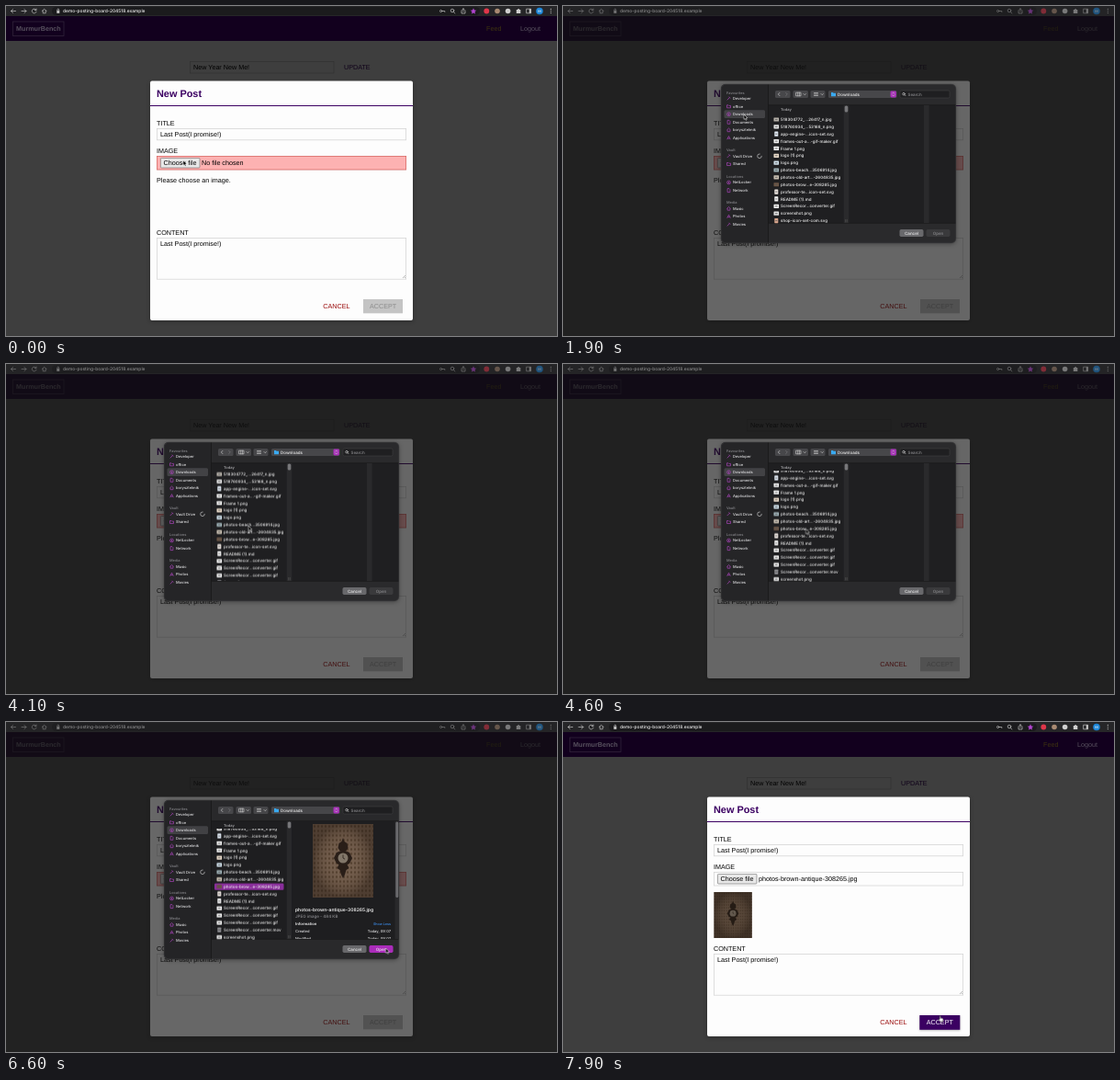
An HTML page for the animation above (8 s loop, 600x359 px).

```html
<!DOCTYPE html>
<html lang="en">
<head>
<meta charset="utf-8">
<title>New post</title>
<style>
html, body { margin: 0; width: 100%; height: 100%; overflow: hidden; background: #3e3e3e; }
svg { display: block; }
text { font: 7.2px "Liberation Sans", Arial, sans-serif; white-space: pre; text-rendering: geometricPrecision; }
.ui text { font-family: Inter, sans-serif; font-size: 4.5px; font-weight: 500; fill: #f2f2f2; }
.ui .b { font-weight: 600; }
.ui .dim { fill: #8d8d90; }
.ui .side { font-size: 4.05px; fill: #e2e2e4; }
.ui .head { font-size: 3.9px; font-weight: 600; fill: #7b7b7f; }
.line { fill: none; stroke: #c4c4c4; stroke-width: .7; stroke-linecap: round; stroke-linejoin: round; }
.pink { fill: none; stroke: #a844b8; stroke-width: .7; }
.field { fill: #fdfdfd; stroke: #d6d6d6; stroke-width: .8; }

.a { animation: 8s linear infinite; }
.on, .off { animation: 8s step-end infinite; }
.on { opacity: 0; }
.sheet { opacity: 0; animation-name: sheet; }
.shade { opacity: 0; animation-name: shade; }
.cursor { animation-name: move; animation-timing-function: ease-in-out; }
.scroll { animation-name: scroll; animation-timing-function: ease-in-out; }
.short { animation-name: hideShort; }
.full { animation-name: showFull; }
.sel { animation-name: select; }
.prev { animation-name: preview; }
.empty { animation-name: unfill; }
.picked { animation-name: fill; }
.hand { animation-name: toHand; }
.arrow { animation-name: fromArrow; }

@keyframes sheet {
  0%, 2.5% { opacity: 0; transform: translateY(-12px); }
  7.5%, 82.5% { opacity: 1; transform: none; }
  85% { opacity: .3; transform: translateY(-10px); }
  87.5%, 100% { opacity: 0; transform: translateY(-15px); }
}
@keyframes shade {
  0%, 2.5% { opacity: 0; }
  7.5%, 82.5% { opacity: 1; }
  85% { opacity: .2; }
  87.5%, 100% { opacity: 0; }
}
@keyframes move {
  0%, 12.5% { transform: translate(193px, 168px); }
  21.25%, 30% { transform: translate(197px, 118px); }
  40%, 48.75% { transform: translate(264px, 175.5px); }
  57.5%, 63.75% { transform: translate(264.5px, 179.5px); }
  72.5%, 74.5% { transform: translate(461px, 251.5px); }
  80%, 92.5% { transform: translate(413.5px, 246px); }
  98%, 100% { transform: translate(410px, 319.5px); }
}
@keyframes scroll {
  0%, 48.75% { transform: none; }
  56.25%, 100% { transform: translateY(-15.3px); }
}
@keyframes hideShort { 27.5%, 100% { opacity: 0; } }
@keyframes showFull { 27.5%, 100% { opacity: 1; } }
@keyframes select { 61.25%, 100% { opacity: 1; } }
@keyframes preview { 63.75%, 100% { opacity: 1; } }
@keyframes unfill { 87.5%, 100% { opacity: 0; } }
@keyframes fill { 87.5%, 100% { opacity: 1; } }
@keyframes toHand { 96.25%, 100% { opacity: 1; } }
@keyframes fromArrow { 96.25%, 100% { opacity: 0; } }
</style>
</head>
<body>
<svg width="600" height="359" viewBox="0 0 600 359">
  <defs>
    <filter id="soft" x="-20%" y="-20%" width="140%" height="140%"><feGaussianBlur stdDeviation="2.5"/></filter>
    <filter id="tight" x="-20%" y="-40%" width="140%" height="180%"><feGaussianBlur stdDeviation="1"/></filter>
    <clipPath id="rows"><rect x="224" y="116.3" width="82" height="120"/></clipPath>
    <clipPath id="info"><rect x="311" y="108" width="117" height="128"/></clipPath>
    <clipPath id="win"><rect x="172" y="85" width="256" height="173" rx="5"/></clipPath>
    <radialGradient id="vig"><stop offset=".3" stop-color="#6a5442" stop-opacity="0"/><stop offset="1" stop-color="#2a1e16" stop-opacity=".5"/></radialGradient>
    <pattern id="damask" width="4" height="5" patternUnits="userSpaceOnUse">
      <path d="M2 .5L3.200 2.500 2 4.500.8 2.500z" fill="#54402f"/>
    </pattern>
    <symbol id="photo" viewBox="0 0 66 80" preserveAspectRatio="none">
      <rect width="66" height="80" fill="#75604f"/>
      <rect width="66" height="80" fill="url(#damask)"/>
      <rect width="66" height="80" fill="url(#vig)"/>
      <path d="M33 15l1.500 4 3 2 1 5-2 3h-7l-2-3 1-5 3-2zM28.500 44h9l2 4-3 2-1.500 5-2 4-2-4-1.500-5-3-2z" fill="#2a1f19"/>
      <path d="M23 37l3-6 7-3 7 3 3 6-3 6-7 3-7-3z" fill="#2a1f19"/>
      <circle cx="33" cy="37" r="5.500" fill="#82776a"/>
      <path d="M33 33.500V37l2 1.200" fill="none" stroke="#2a1f19" stroke-width=".8"/>
    </symbol>
  </defs>

  <!-- page -->
  <rect width="600" height="359" fill="#3e3e3e"/>
  <rect y="11" width="600" height="27" fill="#12001e"/>
  <rect x="7.5" y="17" width="55.5" height="15.5" fill="none" stroke="#30243a" stroke-width=".8"/>
  <text x="11" y="27.2" style="font-weight:bold" fill="#57505e">MurmurBench</text>
  <text x="523" y="27.2" fill="#3f3310">Feed</text>
  <text x="560" y="27.2" fill="#57505e">Logout</text>
  <rect x="200.5" y="60.5" width="156.5" height="12.5" fill="#3e3e3e" stroke="#323232" stroke-width=".8"/>
  <text x="204" y="69.2">New Year New Me!</text>
  <text x="368" y="69.2" fill="#0f0019">UPDATE</text>

  <!-- post form -->
  <rect x="157" y="83" width="286" height="260" fill="#000" opacity=".3" filter="url(#soft)"/>
  <rect x="157" y="81.5" width="286" height="260.5" rx="2" fill="#fdfdfd"/>
  <text x="164" y="98.5" style="font-size:10.9px;font-weight:bold" fill="#3b0062">New Post</text>
  <rect x="157" y="108" width="286" height="1" fill="#3b0062"/>
  <text x="164" y="129.8">TITLE</text>
  <rect class="field" x="164.4" y="133.4" width="271.2" height="12.4"/>
  <text x="168" y="142.2">Last Post(I promise!)</text>
  <text x="164" y="159.6">IMAGE</text>
  <rect class="field" x="164.4" y="163.4" width="271.2" height="14.6"/>
  <g class="off empty">
    <rect x="164.4" y="163.4" width="271.2" height="14.6" fill="#fdb2b2" stroke="#dc6a66" stroke-width=".8"/>
    <text x="213" y="173.3">No file chosen</text>
    <text x="164" y="191.8">Please choose an image.</text>
  </g>
  <g class="on picked">
    <text x="213" y="173.3">photos-brown-antique-308265.jpg</text>
    <use href="#photo" x="164.3" y="185" width="41.5" height="50"/>
    <rect x="164.3" y="185" width="41.5" height="50" fill="#1c140e" opacity=".3"/>
  </g>
  <rect x="168.4" y="165.4" width="42.6" height="10.6" rx="1" fill="#e8e8e8" stroke="#7a7a7a" stroke-width=".7"/>
  <text x="171.5" y="173.3">Choose file</text>
  <text x="164" y="248.8">CONTENT</text>
  <rect class="field" x="164.4" y="252.4" width="271.2" height="44.8"/>
  <path d="M432 296l3-3M434 296l1-1" stroke="#777" stroke-width=".5"/>
  <text x="168" y="261.2">Last Post(I promise!)</text>
  <text x="345.3" y="329.4" fill="#980606">CANCEL</text>
  <g class="off empty">
    <rect x="389" y="319" width="43" height="15.3" fill="#c4c4c4"/>
    <text x="396" y="329.4" fill="#8c8c8c">ACCEPT</text>
  </g>
  <g class="on picked">
    <rect class="on hand" x="388.3" y="319.8" width="44" height="15.8" fill="#000" filter="url(#tight)" fill-opacity=".28"/>
    <rect x="388.3" y="319" width="44" height="15.8" fill="#3b0062"/>
    <text x="395.7" y="329.4" fill="#fff">ACCEPT</text>
  </g>
  <rect class="a shade" y="11" width="600" height="348" fill="rgba(18,18,18,.64)"/>

  <!-- browser bar -->
  <g class="ui">
    <rect width="600" height="11" fill="#262628"/>
    <rect x="50" y="1" width="466" height="9" rx="4.5" fill="#1b1b1d"/>
    <path class="line" d="M10.500 5.500h-5m2-2l-2 2 2 2M17 5.500h5m-2-2l2 2-2 2M32.800 4.300a2.400 2.400 0 1 0 .2 2M33 3v1.500h-1.600M39.300 5.500L41.700 3.200 44 5.500M40.200 5v2.800h3V5"/>
    <path d="M55.300 4.900h3v3h-3z" fill="#c4c4c4"/>
    <path class="line" d="M55.900 4.900V4a.9.9 0 0 1 1.800 0v.9"/>
    <text x="62" y="7.300" style="font-size:4.900px">demo-posting-board-204518.example</text>
    <g class="line">
      <circle cx="473.600" cy="5.500" r="1.100"/><path d="M474.800 5.500h3v1"/>
      <circle cx="486" cy="5" r="1.800"/><path d="M487.400 6.500l1.500 1.500M498 6V2.800m-1.300 1.200L498 2.800l1.300 1.200M496 5v3h4V5"/>
      <rect x="567" y="3.200" width="4.600" height="4.600"/>
    </g>
    <path d="M509 2.300l1 2.200 2.300.2-1.800 1.600.6 2.300-2.100-1.200-2.100 1.200.6-2.300-1.800-1.600 2.300-.2z" fill="#b445d2"/>
    <circle cx="523.300" cy="5.500" r="2.900" fill="#e0364a"/>
    <circle cx="535" cy="5.500" r="2.800" fill="#a98a72"/>
    <circle cx="546.600" cy="5.500" r="2.800" fill="#cfcfcf"/>
    <path d="M555.800 4h1.300a1 1 0 0 1 2 0h1.200v4h-4.500z" fill="#d0d0d0"/>
    <rect x="569.800" y="3.200" width="1.800" height="4.600" fill="#d0d0d0"/>
    <circle cx="581" cy="5.500" r="3.800" fill="#1c86d8"/>
    <text x="579.300" y="7" style="font-size:3.800px">M</text>
    <g fill="#c4c4c4"><circle cx="593.300" cy="3.400" r=".6"/><circle cx="593.300" cy="5.500" r=".6"/><circle cx="593.300" cy="7.600" r=".6"/></g>
    <rect class="a shade" width="600" height="11" fill="rgba(34,34,36,.5)"/>
  </g>

  <!-- file picker -->
  <g class="ui a sheet">
    <rect x="172" y="86" width="256" height="173" rx="5" opacity=".35" filter="url(#soft)"/>
    <g clip-path="url(#win)">
      <rect x="172" y="85" width="256" height="173" fill="#2a2a2c"/>
      <rect x="172" y="85" width="51.500" height="173" fill="#252527"/>
      <rect x="223.500" y="108" width="205" height="128" fill="#1f1f21"/>
      <path d="M223.500 85v173M223.500 107.700H428M223.500 236.300H428" stroke="#151515" stroke-width=".6"/>
    </g>
    <rect x="172.200" y="85.200" width="255.600" height="172.600" rx="5" fill="none" stroke="#414143" stroke-width=".5"/>
    <g id="places"></g>

    <g fill="#47474a">
      <rect x="231" y="92" width="16.500" height="8" rx="1.500"/>
      <rect x="250.500" y="92" width="16.500" height="8" rx="1.500"/>
      <rect x="269.500" y="92" width="16" height="8" rx="1.500"/>
      <rect x="289" y="92" width="74.500" height="8" rx="1.500"/>
    </g>
    <path class="line" d="M236 94.300L234.300 96l1.700 1.700M262 95.500l1.200 1.200 1.200-1.200M281 95.500l1.200 1.200 1.200-1.200M254 94.200h5v3.600h-5zM255.700 94.200v3.600M257.400 94.200v3.600M273.500 94.500h4m-4 1.500h4m-4 1.500h4"/>
    <path class="line" d="M242.600 94.300l1.700 1.700-1.700 1.700" style="stroke:#77777a"/>
    <path d="M292 94h2l.6.700h2.400v3.500h-5z" fill="#3aa9f0"/>
    <text x="299" y="97.600">Downloads</text>
    <rect x="356.500" y="92.600" width="6.400" height="6.800" rx="1.400" fill="#a92fba"/>
    <path class="line" d="M358.500 95.200l1.200-1.200 1.200 1.200M358.500 96.800l1.200 1.200 1.200-1.200"/>
    <rect x="367" y="92" width="54" height="8" rx="1.500" fill="#1f1f21" stroke="#444" stroke-width=".5"/>
    <circle class="line" cx="371" cy="95.700" r="1.300"/><path class="line" d="M372 96.700l1 1"/>
    <text x="375.500" y="97.500" class="dim">Search</text>

    <text x="237" y="114.300" class="b" style="font-size:4px;fill:#a0a0a3">Today</text>
    <g clip-path="url(#rows)"><g class="a scroll" id="files"></g></g>
    <rect x="305.700" y="108" width="5.600" height="128" fill="#2a2a2c"/>
    <rect x="306.700" y="108.500" width="3.600" height="7" rx="1.600" fill="#77777a"/>
    <path class="line" d="M307.700 232.500v2.500M309.200 232.500v2.500" style="stroke:#555"/>
    <rect x="393" y="108" width="5.600" height="128" fill="#2a2a2c"/>

    <g class="on prev" clip-path="url(#info)">
      <rect x="311.300" y="108" width="116.500" height="128" fill="#1f1f21"/>
      <rect x="423.500" y="108" width="4.500" height="128" fill="#2a2a2c"/>
      <rect x="424.300" y="108.500" width="3" height="82.500" rx="1.500" fill="#6b6b6e"/>
      <use href="#photo" x="334" y="111" width="66" height="80"/>
      <text x="315" y="205.700" class="b" style="font-size:5px">photos-brown-antique-308265.jpg</text>
      <text x="315" y="212.800" class="dim">JPEG image - 484 KB</text>
      <text x="315" y="221.400" class="b" style="font-size:4.200px">Information</text>
      <text x="419" y="221.300" text-anchor="end" style="font-size:3.700px;fill:#3d8fee">Show Less</text>
      <g id="dates"></g>
    </g>

    <rect x="366.500" y="243" width="26" height="8" rx="1.700" fill="#69696c"/>
    <text x="379.500" y="248.600" text-anchor="middle">Cancel</text>
    <rect x="395.500" y="243" width="26" height="8" rx="1.700" fill="#3a3a3c"/>
    <text x="408.500" y="248.600" text-anchor="middle" class="dim">Open</text>
    <g class="on prev">
      <rect x="395.500" y="243" width="26" height="8" rx="1.700" fill="#ac2dbc"/>
      <text x="408.500" y="248.600" text-anchor="middle">Open</text>
    </g>
  </g>

  <g class="a cursor">
    <path class="off arrow" d="M0 0v5.400l1.200-1.100.9 2 1-.5-.9-1.900h1.700z" fill="#000" stroke="#fff" stroke-width=".5"/>
    <path class="on hand" d="M.2.500q.6-.8 1.100 0v2l2.300.6q.6.300.5 1L3.700 6.500H.7L-1.200 4q.2-.9 1.400 0z" fill="#fff" stroke="#000" stroke-width=".45"/>
  </g>
</svg>
<script>
const $ = id => document.getElementById(id);
const label = (x, y, s, cls = "") => `<text x="${x}" y="${y}" class="${cls}">${s}</text>`;

// Sidebar: heading, its y, first item y, items
const groups = [
  ["Favourites", 94.2, 100.5, ["Developer", "office", "Downloads", "Documents", "borysztelmik", "Applications"]],
  ["Vault", 156.5, 163.2, ["Vault Drive", "Shared"]],
  ["Locations", 185.2, 192, ["NetLocker", "Network"]],
  ["Media", 213.9, 220.4, ["Music", "Photos", "Movies"]]
];
const glyphs = [
  "M-1.8 1.8L1 -1M0 -1.8L1.8 0", "M-2 -1.3h1.5l.6.6h1.9v2.4h-4z",
  "M-1.9 0a1.9 1.9 0 1 0 3.8 0a1.9 1.9 0 1 0 -3.8 0M0 -1v2m-.8-.8l.8.8.8-.8",
  "M-1.4 -2h1.8l1 1v3h-2.8z", "M-2 0L0 -1.9 2 0M-1.4 -.4v2.2h2.8v-2.2",
  "M-1.8 1.7L0 -1.9 1.8 1.7M-1.2 .6h2.4"
];
let html = '<rect x="175.5" y="113.3" width="44.5" height="8.6" rx="1.5" fill="#424245"/>', n = 0;
for (const [head, hy, y0, items] of groups) {
  html += label(178, hy + 1.3, head, "head");
  items.forEach((item, i) => {
    const y = y0 + i * 8.6;
    html += `<path class="pink" transform="translate(180.5 ${y})" d="${glyphs[n++ % glyphs.length]}"/>` +
      label(185, y + 1.4, item, "side");
  });
}
html += '<circle class="line" cx="214" cy="163.3" r="2.3" stroke-dasharray="10 4"/>';
$("places").innerHTML = html;

// Files: name, icon colour
const common = [
  ["518304772_…26417_n.jpg", "#b9b4ac"], ["518760934_…53168_n.png", "#e6e6e6"],
  ["app-engine-…icon-set.svg", "#dfe8f2"], ["frames-out-a…-gif-maker.gif", "#efefef"],
  ["Frame 1.png", "#f2f2f2"], ["logo (1).png", "#e8d9c8"], ["logo.png", "#cfe0ea"],
  ["photos-beach…3506914.jpg", "#9fb3b8"], ["photos-old-art…-2604835.jpg", "#c9c0b2"],
  ["photos-brow…e-308265.jpg", "#6c5645"], ["professor-te…icon-set.svg", "#e9e2dd"],
  ["README (1).md", "#f4f4f4"], ["ScreenRecor…converter.gif", "#f0f0f0"]
];
const shot = ["screenshot.png", "#e4e4e4"], gif = common[12];
const shortTail = [shot, ["shop-icon-set-com.svg", "#d8a58c"]];
const fullTail = [gif, gif, ["ScreenRecor…converter.mov", "#8a8a8e"], shot, shortTail[1]];

const rowY = i => 123.5 + i * 7.86;
const row = ([name, color], i) => {
  const y = rowY(i), tall = /svg|md|mov/.test(name);
  const [w, h] = tall ? [4, 5.2] : [5.6, 4.2];
  return `<rect x="${232.3 - w / 2}" y="${y - h / 2}" width="${w}" height="${h}" rx=".4" fill="${color}"/>` +
    `<rect x="${232.3 - w / 4}" y="${y - .6}" width="${w / 2}" height="1.2" fill="#555" opacity=".7"/>` +
    label(237, y + 1.6, name);
};
const tail = (list, cls) =>
  `<g class="${cls}">${list.map((f, i) => row(f, i + common.length)).join("")}</g>`;
$("files").innerHTML =
  `<rect class="on sel" x="227" y="${rowY(9) - 3.6}" width="75.5" height="7.4" rx="1.4" fill="#8a2f9c"/>` +
  common.map(row).join("") + tail(shortTail, "off short") + tail(fullTail, "on full");

$("dates").innerHTML = ["Created", "Modified"].map((s, i) => {
  const y = 229.3 + i * 8;
  return label(315, y, s, "side dim") +
    `<text x="419" y="${y}" text-anchor="end" class="side">Today, 09:07</text>`;
}).join("");
</script>
</body>
</html>
```
